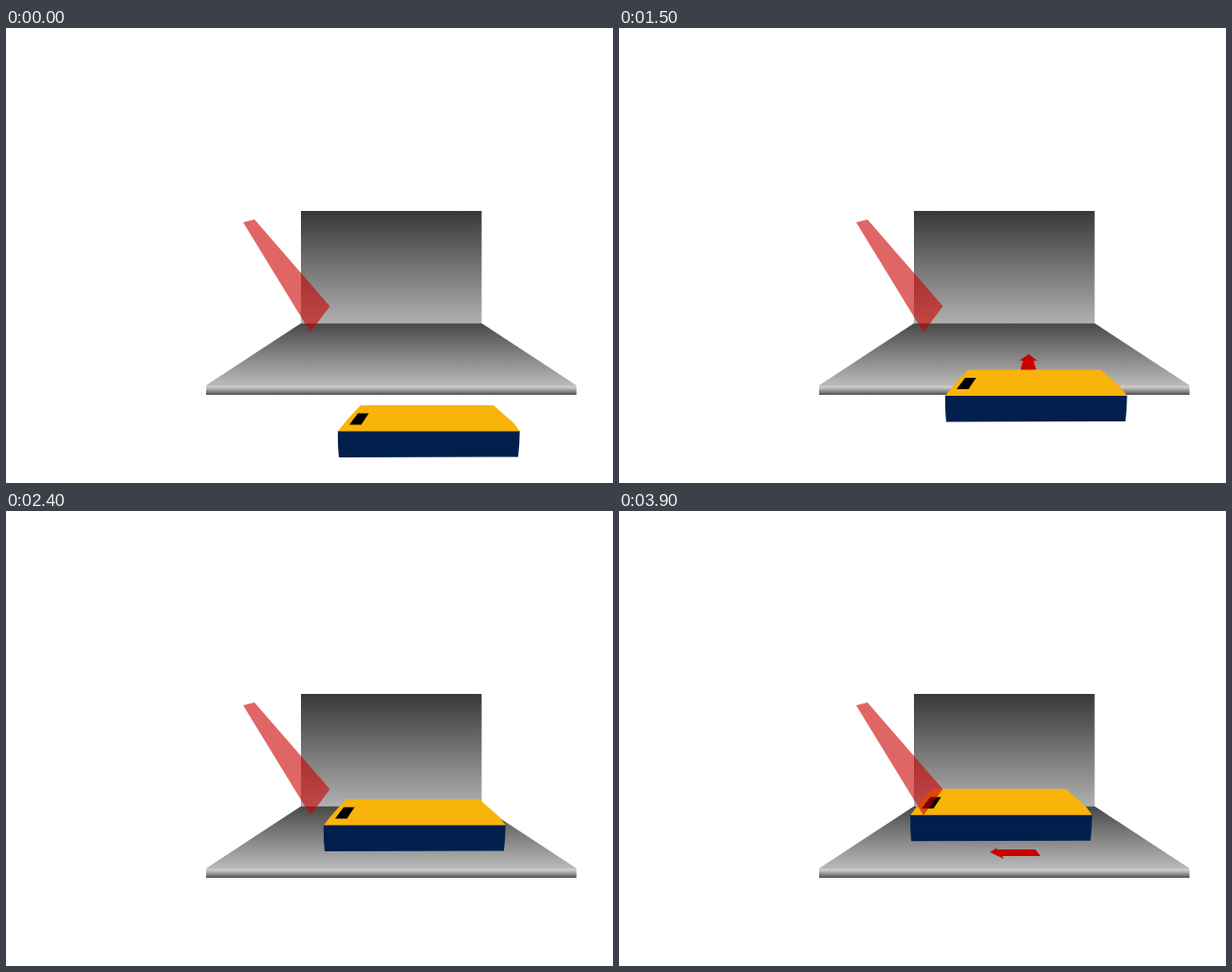
Write an HTML page that moves like this. It is 640 px wide and 480 px high and loops after 5400 ms.

```html
<!DOCTYPE html>
<html lang="en">
<head>
<meta charset="utf-8">
<title>Box placed on a scanning stage</title>
<style>
  html, body { margin: 0; width: 100%; height: 100%; overflow: hidden; background: #fff; }
  svg { display: block; width: 100%; height: 100%; }
</style>
</head>
<body>
<svg viewBox="0 0 640 480">
  <defs>
    <linearGradient id="wallFill" x2="0" y2="1">
      <stop stop-color="#383838"/><stop offset="1" stop-color="#b0b0b0"/>
    </linearGradient>
    <linearGradient id="floorFill" x2="0" y2="1">
      <stop stop-color="#484848"/><stop offset="1" stop-color="#bababa"/>
    </linearGradient>
    <linearGradient id="lipFill" x2="0" y2="1">
      <stop stop-color="#c4c4c4"/><stop offset=".2" stop-color="#cccccc"/><stop offset="1" stop-color="#505050"/>
    </linearGradient>
  </defs>
  <path fill="url(#wallFill)" d="M311 193H501.5V311.5H311Z"/>
  <path fill="url(#floorFill)" d="M311 311.5H501.5L601.5 377H211Z"/>
  <path fill="url(#lipFill)" d="M211 377H601.5V387H211Z"/>
  <g fill="#c00">
    <path id="upArrow" d="M432 344L441 351H437L443 371.5H420.5L426 351H422Z"/>
    <path id="leftArrow" d="M391 360L399 355L398 357H439L444.500 364H404L406 367Z"/>
  </g>
  <g id="box">
    <path fill="#001f4d" d="M350 425H541.7Q541.500 440 540 452.500L351 453Q349.500 440 350 425Z"/>
    <path fill="#f9b40a" d="M374 398H514L535 416.500L541.7 425.500H350Q360 412 374 398Z"/>
    <path d="M371 406.500H382.500L374.500 418.500H362Z"/>
  </g>
  <path fill="#c00" fill-opacity=".6" d="M250 205L262 202L341.500 293.500L321 321Z"/>
</svg>
<script>
const LOOP = 5400, TICK = 100;
const [box, upArrow, leftArrow] = ['box', 'upArrow', 'leftArrow'].map(id => document.getElementById(id));
const clamp = (v, lo, hi) => Math.min(hi, Math.max(lo, v));
const show = (el, on) => el.setAttribute('visibility', on ? 'visible' : 'hidden');

function draw(now) {
  const tick = Math.floor(now % LOOP / TICK);
  const push = clamp(tick - 9, 0, 17);
  const slide = tick < 31 ? 0 : 0.5 + 3.17 * (Math.min(tick, 39) - 31);
  const x = -push - slide;
  const y = -Math.min(6.27 * push, 104.7);
  box.setAttribute('transform', `translate(${x} ${y})`);
  show(upArrow, tick >= 2 && tick < 22);
  show(leftArrow, tick >= 28);
}

const start = performance.now();
function frame() {
  draw(performance.now() - start);
  requestAnimationFrame(frame);
}
frame();
</script>
</body>
</html>
```
